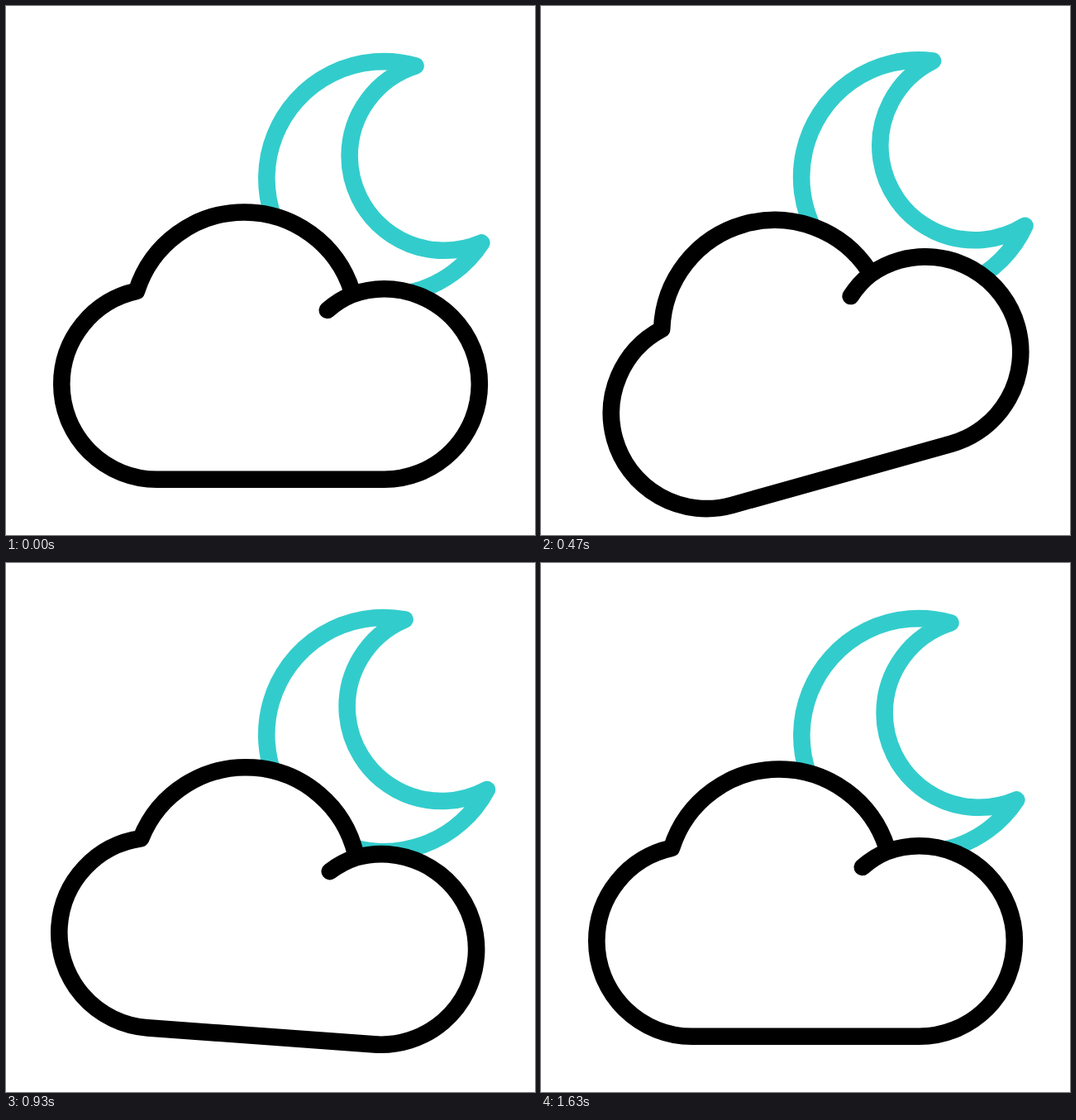
Animation of 640x640 px, one loop 1.67 s. Source, as an HTML page:

```html
<!DOCTYPE html>
<html>
<head>
<meta charset="utf-8">
<title>Cloudy night</title>
<style>
  html, body { margin: 0; width: 100%; height: 100%; overflow: hidden; background: #fff; }
  svg { display: block; width: 100%; height: 100%; }
  path { fill: #fff; stroke-width: 20.6; stroke-linecap: round; stroke-linejoin: round; }
</style>
</head>
<body>
<svg viewBox="0 0 640 640">
  <path id="moon" stroke="#3cc" d="M495.5 72.5A141.6 141.6 0 1 0 575.3 286.5A114.5 114.5 0 0 1 415.6 181A114.5 114.5 0 0 1 495.5 72.5Z"/>
  <path id="cloud" stroke="#000" d="M388.8 368Q403 355.5 419 349A115.3 115.3 0 0 1 457.6 342.2A115.3 115.3 0 0 1 457.6 572.8H182.6A115.3 115.3 0 0 1 67.3 457.5A115.3 115.3 0 0 1 158 344.9A136.6 136.6 0 0 1 418.5 344.9"/>
</svg>
<script>
  const LOOP = 1670, STEP = 33.35, DAMPING = 0.477;

  // turns: steps at which the swing starts, reverses and comes to rest
  const parts = [
    { id: 'moon', pivot: '445.5 209.5', swing: -32, turns: [2, 9.5, 18.6, 30.2, 40, 49] },
    { id: 'cloud', pivot: '320 411', swing: -15.65, turns: [5.5, 14.2, 23.8, 35.2, 44] }
  ];

  // Each swing goes the other way and is weaker than the last
  function angleAt({ swing, turns }, step) {
    const last = turns.length - 1;
    const next = turns.findIndex(at => at > step);
    if (next < 1) return 0;
    const peak = i => i === 0 || i === last ? 0 : swing * (-DAMPING) ** (i - 1);
    const start = turns[next - 1];
    const eased = (1 - Math.cos(Math.PI * (step - start) / (turns[next] - start))) / 2;
    return peak(next - 1) + (peak(next) - peak(next - 1)) * eased;
  }

  function draw() {
    // The picture advances at 30 steps per second
    const step = Math.floor((performance.now() % LOOP + 5) / STEP);
    for (const part of parts) {
      document.getElementById(part.id)
        .setAttribute('transform', `rotate(${angleAt(part, step)} ${part.pivot})`);
    }
    requestAnimationFrame(draw);
  }
  draw();
</script>
</body>
</html>
```
